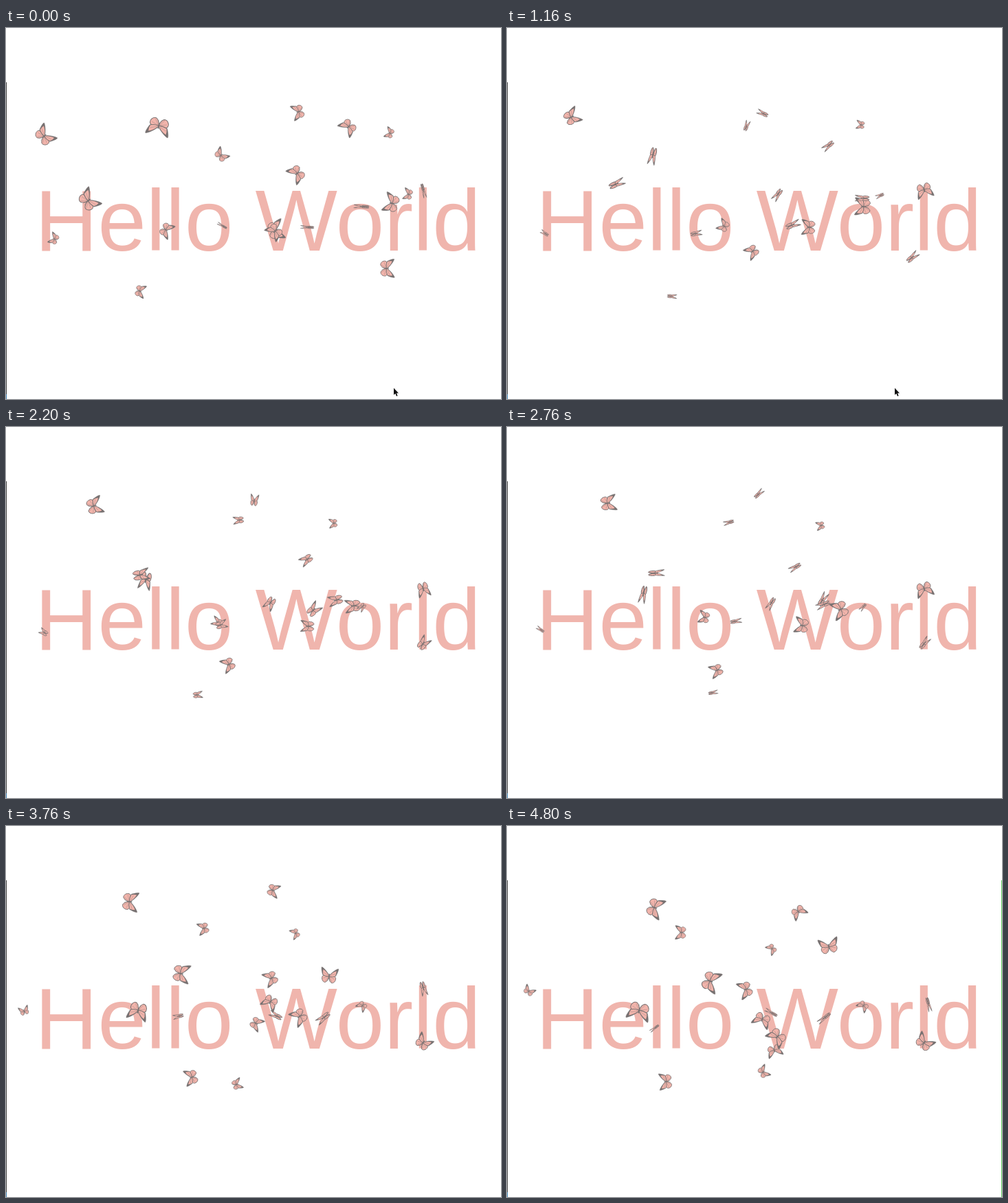
An HTML page with a canvas for the animation above (4.84 s loop, 720x540 px).

```html
<!DOCTYPE html>
<html lang="en">
<head>
<meta charset="utf-8">
<title>Hello World</title>
<style>
  html, body { margin: 0; width: 100%; height: 100%; overflow: hidden; background: #fff; }
  svg, canvas { position: absolute; left: 0; top: 0; width: 720px; height: 540px; }
  text { font: 126.6px "Liberation Sans", Arial, sans-serif; word-spacing: -0.025em; fill: #f0b5ad; }
</style>
</head>
<body>
<svg viewBox="0 0 720 540"><text x="42" y="324">Hello World</text></svg>
<canvas width="720" height="540"></canvas>
<script>
const LOOP = 4840, STEP = 40, END = 4800, BEAT = 266, TAU = Math.PI * 2;
const DARK = '#767070', PINK = '#f2b4ab';
const ctx = document.querySelector('canvas').getContext('2d');
const flies = [];

// Flies a smooth curve through a few points, evenly spaced in time.
// rest: pause on the way; lands: end of the flight; flap, phase: wing beat
function fly(size, points, { rest = [0, 0], lands = END, flap = 0.8, phase = 0 } = {}) {
  flies.push({ size, points, rest, lands, flap, phase });
}

const glide = { flap: 0.25 };
const perched = (until, lands) => ({ rest: [0, until], lands, phase: 0.5 });

fly(22, [[315, 288], [264, 275], [215, 294]], perched(2000));
fly(28, [[439, 290], [414, 285], [385, 272]], perched(2440, 3960));
fly(32, [[518, 260], [489, 264], [462, 279]], perched(1860, 3420));
fly(30, [[607, 236], [613, 259]], perched(4200));
fly(32, [[56, 157], [135, 113], [215, 119]], glide);
fly(36, [[222, 143], [207, 207], [192, 269]], { lands: 3500 });
fly(22, [[313, 185], [348, 137], [308, 143], [253, 155]]);
fly(24, [[425, 122], [364, 118], [374, 93], [424, 125]]);
fly(27, [[498, 144], [431, 197], [347, 238]]);
fly(17, [[558, 153], [469, 141], [385, 179]], glide);
fly(28, [[423, 212], [394, 242], [371, 282]], { rest: [1600, 4100] });
fly(34, [[120, 251], [203, 214], [296, 226]]);
fly(18, [[70, 307], [29, 275], [32, 240]], { rest: [330, 2600] });
fly(24, [[233, 294], [291, 295], [347, 282], [389, 327]]);
fly(31, [[392, 294], [458, 253], [468, 175]], { rest: [0, 600] });
fly(30, [[561, 255], [473, 254], [393, 307]]);
fly(18, [[585, 242], [548, 242], [518, 262]], { lands: 2000 });
fly(29, [[554, 350], [580, 341], [607, 315]], { lands: 1720 });
fly(20, [[195, 383], [286, 389], [373, 358]]);
fly(26, [[391, 296], [317, 349], [231, 372]], glide);

const clamp = (v, lo, hi) => Math.min(hi, Math.max(lo, v));

// Lagrange curve through the points, u from 0 to 1
function along(points, u) {
  const w = u * (points.length - 1);
  return points.reduce((sum, p, i) => {
    const k = points.reduce((m, _, j) => j === i ? m : m * (w - j) / (i - j), 1);
    return [sum[0] + k * p[0], sum[1] + k * p[1]];
  }, [0, 0]);
}

function pose({ points, rest: [from, to], lands, flap, phase }, t) {
  const now = Math.min(t, lands);
  const u = (now - clamp(now - from, 0, to - from)) / (lands - to + from);
  const [x, y] = along(points, u);
  const [x0, y0] = along(points, u - 0.01);
  const [x1, y1] = along(points, u + 0.01);
  const beat = 0.5 - 0.5 * Math.cos(TAU * (t / BEAT + phase));
  return { x, y, angle: Math.atan2(y1 - y0, x1 - x0), open: 0.95 - flap * beat };
}

// Wing outlines for a wingspan of 1, pointing up
const fore = c => {
  c.moveTo(0, -0.02);
  c.bezierCurveTo(0.1, -0.15, 0.34, -0.34, 0.48, -0.38);
  c.bezierCurveTo(0.52, -0.34, 0.44, -0.14, 0.38, -0.02);
  c.quadraticCurveTo(0.2, 0.06, 0, 0.03);
};
const cell = c => {
  c.moveTo(0.03, -0.02);
  c.quadraticCurveTo(0.2, -0.21, 0.38, -0.27);
  c.quadraticCurveTo(0.4, -0.13, 0.35, -0.03);
  c.quadraticCurveTo(0.18, 0.03, 0.03, 0.01);
};
const hind = c => {
  c.moveTo(0, 0.02);
  c.bezierCurveTo(0.14, -0.02, 0.34, -0.04, 0.39, 0.06);
  c.bezierCurveTo(0.43, 0.2, 0.3, 0.34, 0.17, 0.31);
  c.quadraticCurveTo(0.06, 0.26, 0, 0.05);
};
const veins = c => {
  c.moveTo(0.02, 0.03); c.lineTo(0.33, 0.13);
  c.moveTo(0.02, 0.03); c.lineTo(0.2, 0.27);
  c.moveTo(0.05, -0.02); c.lineTo(0.35, -0.13);
};
const body = c => { c.moveTo(0, -0.1); c.lineTo(0, 0.13); };
const feelers = c => {
  c.moveTo(-0.06, 0.27); c.lineTo(0, 0.12); c.lineTo(0.06, 0.27);
};

// Shapes are squeezed, line widths are not
function draw(shape, sx, sy, fill, line, width) {
  ctx.save();
  ctx.scale(sx, sy);
  ctx.beginPath();
  shape(ctx);
  ctx.restore();
  if (fill) { ctx.fillStyle = fill; ctx.fill(); }
  if (line) { ctx.strokeStyle = line; ctx.lineWidth = width; ctx.stroke(); }
}

function drawFly(f, t) {
  const { x, y, angle, open } = pose(f, t), s = f.size;
  const width = 0.4 + s / 65;
  ctx.save();
  ctx.translate(x, y);
  ctx.rotate(angle + Math.PI / 2);
  ctx.lineJoin = 'round';
  for (const side of [-1, 1]) {
    const sx = side * s * open;
    draw(hind, sx, s, PINK, DARK, width);
    draw(fore, sx, s, DARK, DARK, width * 0.5);
    draw(cell, sx, s, PINK);
    draw(veins, sx, s, null, DARK, 0.3);
  }
  draw(body, s, s, null, DARK, s / 25);
  draw(feelers, s, s, null, DARK, 0.3);
  ctx.restore();
}

function drawCursor(t) {
  if (t > 1600) return;
  const u = Math.max(0, (t - 1240) / 360);
  const arrow = [[0, 0], [0, 10], [2.3, 8], [4, 12], [5.6, 11.3], [4, 7.5], [7, 7.5]];
  ctx.save();
  ctx.translate(564 + 7 * u, 524 + 15 * u);
  ctx.beginPath();
  arrow.forEach(p => ctx.lineTo(...p));
  ctx.closePath();
  ctx.fillStyle = '#111';
  ctx.fill();
  ctx.restore();
}

function bar(color, x, y, h) {
  ctx.fillStyle = color;
  ctx.fillRect(x, y, 1, h);
}

const start = performance.now();
function render() {
  const t = Math.floor((performance.now() - start) % LOOP / STEP) * STEP;
  ctx.clearRect(0, 0, 720, 540);
  bar('#444', 0, 79, 461);
  bar('#3f83b5', 0, 533, 7);
  if (t >= 4680) bar('#62cf62', 719, 79, 461);
  flies.forEach(f => drawFly(f, t));
  drawCursor(t);
  requestAnimationFrame(render);
}
render();
</script>
</body>
</html>
```
